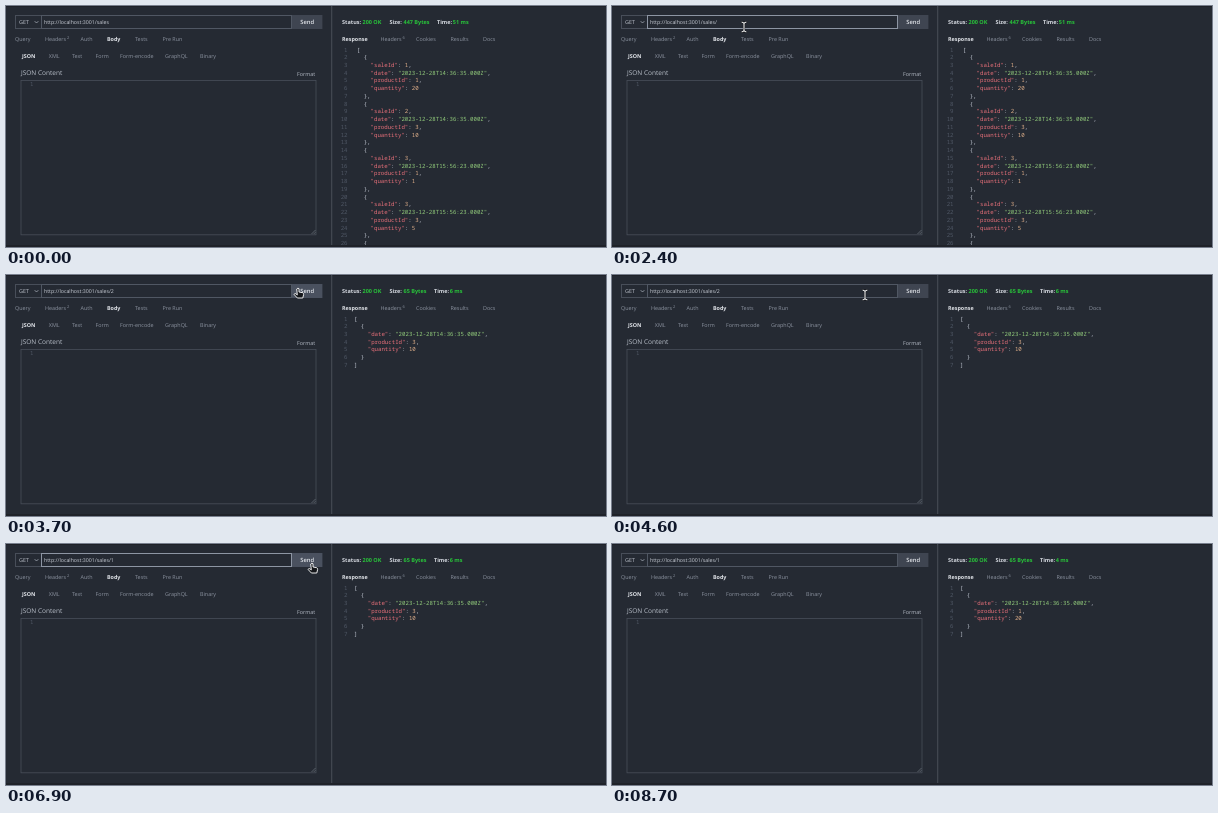
Animation of 600 by 241 pixels, one loop 8.9 s. Source, as an HTML page:

```html
<!DOCTYPE html>
<html lang="en">
<head>
<meta charset="utf-8">
<title>API client</title>
<style>
  html, body { margin: 0; width: 100%; height: 100%; overflow: hidden; background: #252a33; }
  svg { display: block; width: 600px; height: 241px; }
  text { font: 5.4px "Open Sans", "Noto Sans", sans-serif; fill: #8d94a1; white-space: pre; text-rendering: geometricPrecision; }
  .on { font-weight: 700; fill: #e2e5ea; }
  .val { font-size: 5.5px; font-weight: 700; fill: #d5d9e0; }
  .ok { fill: #28c43a; }
  .code { font: 500 5.72px "Noto Sans Mono", "DejaVu Sans Mono", monospace; fill: #c3c9d4; }
  .num { font-weight: 400; fill: #505866; }
  .key { fill: #e8707a; }
  .str { fill: #93cd7c; }
  .lit { fill: #e0b08a; }
</style>
</head>
<body>
<svg id="stage" viewBox="0 0 600 241">
  <rect width="600" height="241" fill="#252a33"/>
  <rect width="600" height="1" fill="#1f2229"/>
  <rect x="325" width="1.3" height="240" fill="#41464f"/>
  <g id="ui"></g>
  <g fill="none" stroke="#484e59">
    <rect x="9.5" y="9.5" width="26" height="13"/>
    <rect id="field" x="35.5" y="9.5" width="250" height="13"/>
    <rect x="15" y="74.4" width="295" height="154.4" stroke-width=".8"/>
    <path d="M28.7 15.2l1.8 1.8 1.8-1.8" stroke="#a9afba" stroke-width=".8"/>
    <path d="M305.5 228l4-4M307.7 228l1.8-1.8" stroke="#7b818c" stroke-width=".6"/>
  </g>
  <rect id="send" x="286" y="9" width="30.4" height="14"/>
  <text class="on" x="301.2" y="18.2" text-anchor="middle" style="font-size:5.8px;font-weight:600">Send</text>
  <text id="url" x="38" y="18" style="font-size:5.25px;fill:#c9ced7"></text>
  <rect id="caret" y="13" width=".8" height="6.6" fill="#e6e9ee"/>
  <g id="replies"></g>
  <rect y="239" width="600" height="2" fill="#1f2229"/>
  <g id="cursor" stroke-linejoin="round" stroke-linecap="round">
    <g id="ibeam" fill="none">
      <path d="M-2-4.8Q0-4.8 0-3.6Q0-4.8 2-4.8M0-3.6V3.6M-2 4.8Q0 4.8 0 3.6Q0 4.8 2 4.8" stroke="#16181d" stroke-width="2.2"/>
      <path d="M-2-4.8Q0-4.8 0-3.6Q0-4.8 2-4.8M0-3.6V3.6M-2 4.8Q0 4.8 0 3.6Q0 4.8 2 4.8" stroke="#fff" stroke-width="1"/>
    </g>
    <path id="hand" d="M-1 .7Q0-.5 1 .7V4L4.6 4.7Q5.8 5.1 5.6 6.6L4.8 10H-.6L-3.8 6.6Q-3.7 5.2-2.2 5.7L-1 6.7Z" fill="#14161a" stroke="#fff" stroke-width=".9"/>
    <path id="arrow" d="M0 0V9.2L2.1 7.3 3.6 10.6 5.1 9.9 3.7 6.7H6.6Z" fill="#14161a" stroke="#fff" stroke-width=".9"/>
  </g>
</svg>
<script>
const $ = id => document.getElementById(id);
const NS = "http://www.w3.org/2000/svg";
const LOOP = 8900, STEP = 100;

function add(parent, tag, attrs, content) {
  const el = document.createElementNS(NS, tag);
  for (const k in attrs) el.setAttribute(k, attrs[k]);
  if (content !== undefined) el.textContent = content;
  parent.append(el);
  return el;
}
const label = (parent, x, y, s, cls = "") => add(parent, "text", { x, y, class: cls }, s);

// Fixed labels
const ui = $("ui");
function tabs(y, active, items) {
  for (const [x, s] of items) label(ui, x, y, s, s === active ? "on" : "");
}
tabs(34.8, "Body", [[9, "Query"], [39, "Headers"], [74.6, "Auth"], [101, "Body"], [129, "Tests"], [156.6, "Pre Run"]]);
tabs(52.2, "JSON", [[16, "JSON"], [42.8, "XML"], [66, "Text"], [89.5, "Form"], [114, "Form-encode"], [159, "GraphQL"], [194, "Binary"]]);
tabs(34.8, "Response", [[336, "Response"], [374.5, "Headers"], [410, "Cookies"], [444.5, "Results"], [477, "Docs"]]);
for (const [x, s] of [[61, "2"], [396.5, "6"]]) label(ui, x, 32.6, s).style.fontSize = "4px";
label(ui, 13, 18, "GET").style.fill = "#c2c7d0";
label(ui, 15, 68.8, "JSON Content").style.cssText = "font-size:6.5px;fill:#b9bfc9";
label(ui, 291, 70, "Format").style.fill = "#b4bac5";
label(ui, 24, 80.2, "1", "code num");

// Response panels
const record = (fields) => ["  {", ...fields.map(([k, v], i) => {
  const val = typeof v === "string" ? `"${v}"` : v;
  return `    "${k}": ${val}${i < fields.length - 1 ? "," : ""}`;
}), "  }"];

function sale(id, time, product, quantity) {
  const rest = [["date", `2023-12-28T${time}.000Z`], ["productId", product], ["quantity", quantity]];
  return record(id ? [["saleId", id], ...rest] : rest);
}
function list(...items) {
  return ["[", ...items.flatMap((rows, i) =>
    i < items.length - 1 ? [...rows.slice(0, -1), rows.at(-1) + ","] : rows), "]"];
}
function codeLine(parent, row, i, left) {
  const y = 45.5 + i * 7.74;
  label(parent, 341.5, y, i + 1, "code num").setAttribute("text-anchor", "end");
  const indent = row.search(/\S/);
  const line = label(parent, left + indent * 3.43, y, undefined, "code");
  const m = row.trim().match(/^("\w+")(: )("[^"]*"|\d+)(,?)$/);
  if (!m) { line.textContent = row.trim(); return; }
  const kinds = ["key", "", m[3][0] === '"' ? "str" : "lit", ""];
  m.slice(1).forEach((s, k) => add(line, "tspan", { class: kinds[k] }, s));
}
function reply(rows, size, time, left) {
  const g = add($("replies"), "g", {});
  const shift = size > 99 ? 0 : -3;
  label(g, 336, 18.3, "Status:", "val");
  label(g, 356.5, 18.3, "200 OK", "val ok");
  label(g, 383.6, 18.3, "Size:", "val");
  label(g, 397.5, 18.3, size + " Bytes", "val ok");
  label(g, 431 + shift, 18.3, "Time:", "val");
  label(g, 446.8 + shift, 18.3, time + " ms", "val ok");
  rows.slice(0, 26).forEach((row, i) => codeLine(g, row, i, left));
  return g;
}
const early = "14:36:35", late = "15:56:23";
const replies = [
  reply(list(sale(1, early, 1, 20), sale(2, early, 3, 10), sale(3, late, 1, 1),
    sale(3, late, 3, 5), sale(4, late, 1, 1)), 447, 51, 350.8),
  reply(list(sale(0, early, 3, 10)), 65, 6, 348),
  reply(list(sale(0, early, 1, 20)), 65, 4, 348),
];

// Timeline
const path = [
  [100, 188, 232], [300, 160, 130], [500, 136, 36], [600, 132, 21], [2500, 132, 21],
  [2600, 138, 23], [2800, 168, 29], [3000, 216, 24], [3200, 279, 10], [3300, 288.5, 12],
  [3400, 292, 13], [4200, 292, 13], [4300, 286, 15], [4400, 271, 18], [4600, 253, 20],
  [5100, 253, 20], [5300, 252.5, 24], [6200, 252.5, 24], [6400, 258, 23], [6700, 293, 19],
  [6900, 306, 19], [7400, 306, 19], [7500, 322, 17], [7700, 371.5, 9.5], [7900, 475, 5], [8000, 555, 1],
];
const typed = [[0, ""], [1800, "/"], [2600, "/2"], [5600, "/"], [6100, "/1"]];
const shown = [[0, 0], [3600, 1], [7200, 2]];
const focus = [[700, 3500], [4700, 7000]];
const blink = [[700, 1200], [1400, 2400], [2600, 3100], [4700, 5200], [5300, 6600]];

const at = (table, t) => table.findLast(([start]) => t >= start)[1];
const within = (spans, t) => spans.some(([a, b]) => t >= a && t < b);
const show = (el, yes) => el.style.display = yes ? "" : "none";

function place(t) {
  const i = Math.max(1, path.findIndex(p => p[0] >= t));
  const [a, x, y] = path[i - 1], [b, u, v] = path[i];
  const k = (t - a) / (b - a);
  return [x + (u - x) * k, y + (v - y) * k];
}
function pointer(x, y) {
  if (x >= 286 && x < 317 && y >= 9 && y < 24) return "hand";
  const overUrl = x > 35 && x < 286 && y > 11 && y < 25;
  const overBody = x > 15 && x < 310 && y > 74 && y < 229;
  return overUrl || overBody ? "ibeam" : "arrow";
}

function draw(now) {
  const t = Math.floor((now % LOOP) / STEP) * STEP;
  const url = $("url");
  url.textContent = "http://localhost:3001/sales" + at(typed, t);
  $("field").setAttribute("stroke", within(focus, t) ? "#8d95a3" : "#505763");
  const caret = $("caret");
  show(caret, within(blink, t));
  caret.setAttribute("x", 38.2 + url.getComputedTextLength());
  const current = at(shown, t);
  replies.forEach((g, i) => show(g, i === current));

  const visible = t >= 100 && t <= 8000;
  let kind = "";
  show($("cursor"), visible);
  if (visible) {
    const [x, y] = place(t);
    kind = pointer(x, y);
    $("cursor").setAttribute("transform", `translate(${x} ${y})`);
    for (const id of ["ibeam", "hand", "arrow"]) show($(id), id === kind);
  }
  $("send").setAttribute("fill", kind === "hand" ? "#4a515f" : "#3f4551");
}

const began = performance.now();
function tick() {
  draw(performance.now() - began);
  requestAnimationFrame(tick);
}
tick();
</script>
</body>
</html>
```
